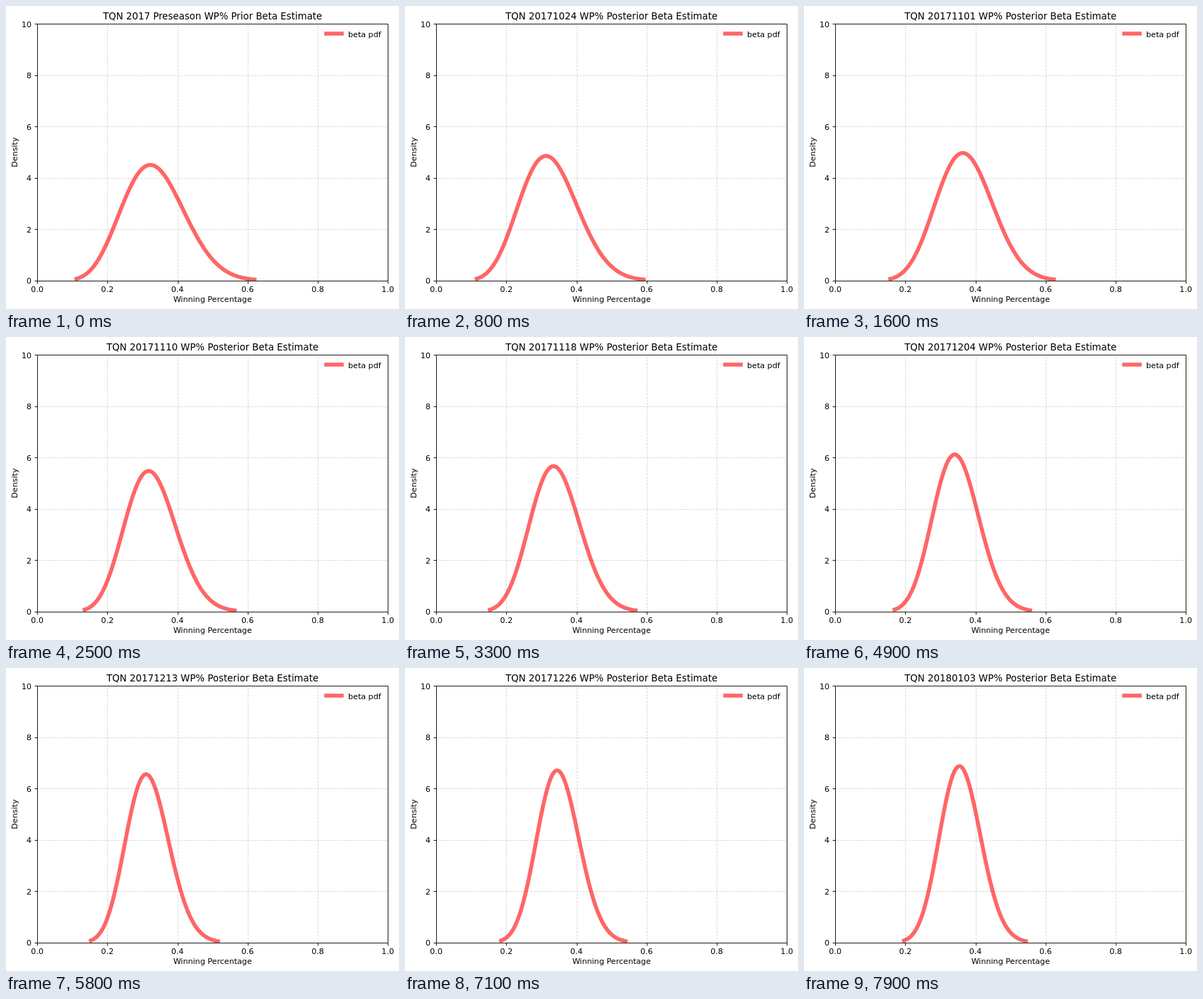
These frames come from a looping animation (556x428 px, 8000 ms). An HTML page:

```html
<!DOCTYPE html>
<html lang="en">
<head>
<meta charset="utf-8">
<title>Beta estimate</title>
<style>
  html, body { margin: 0; width: 100%; height: 100%; overflow: hidden; background: #fff; }
  svg { display: block; font: 11.11px "DejaVu Sans", sans-serif; }
  .mid { text-anchor: middle; }
  .end { text-anchor: end; }
  .title { font-size: 13.33px; }
  .grid { stroke: #b0b0b0; stroke-opacity: .5; stroke-width: .89; stroke-dasharray: 3.29 1.42; }
  .axis { fill: none; stroke: #000; stroke-width: .89; }
  .curve { fill: none; stroke: #f00; stroke-opacity: .6; stroke-width: 5.56; stroke-linecap: square; stroke-linejoin: round; }
</style>
</head>
<body>
<svg id="plot" width="556" height="428" viewBox="0 0 556 428">
  <clipPath id="area"><rect x="44" y="25" width="496" height="363"/></clipPath>
</svg>
<script>
const STEP = 100, STEPS = 80;
const LEFT = 44.2, TOP = 25.4, WIDTH = 496, HEIGHT = 362.4;
const BOTTOM = TOP + HEIGHT, CENTER = LEFT + WIDTH / 2;
const PRIOR = { a: 9.55, b: 18.95 };

// Days after 16 October 2017 on which a game was won or lost
const WINS = [7, 9, 15, 16, 26, 32, 34, 43, 49, 61, 63, 66, 71, 74, 78];
const LOSSES = [2, 4, 5, 12, 18, 20, 21, 23, 25, 28, 31, 37, 39, 41, 45, 47,
  50, 52, 54, 57, 58, 65, 68, 76, 79];

const plot = document.getElementById('plot');

function add(tag, attrs, text = '') {
  const el = document.createElementNS('http://www.w3.org/2000/svg', tag);
  for (const name in attrs) el.setAttribute(name, attrs[name]);
  el.textContent = text;
  return plot.appendChild(el);
}

const label = (x, y, text, cls = '', extra = {}) =>
  add('text', { x, y, class: cls, ...extra }, text);
const path = (d, cls, extra = {}) => add('path', { d, class: cls, ...extra });

// Thin lines sit on pixel centres; the curve keeps exact coordinates
const snap = v => Math.round(v) + .5;
const atX = i => LEFT + WIDTH * i / 5;
const atY = i => BOTTOM - HEIGHT * i / 5;
const [x0, x1, y0, y1] = [atX(0), atX(5), atY(0), atY(5)].map(snap);

for (let i = 1; i < 5; i++) {
  path(`M${snap(atX(i))} ${y0}V${y1}`, 'grid');
  path(`M${x0} ${snap(atY(i))}H${x1}`, 'grid');
}

const group = add('g', { 'clip-path': 'url(#area)' });
const curve = group.appendChild(path('', 'curve'));

for (let i = 0; i <= 5; i++) {
  path(`M${snap(atX(i))} ${y0}v3.9`, 'axis');
  path(`M${x0} ${snap(atY(i))}h-3.9`, 'axis');
  label(atX(i), 404, (i / 5).toFixed(1), 'mid');
  label(36.2, Math.round(atY(i) + 4.3), i * 2, 'end');
}
path(`M${x0} ${y0}V${y1}H${x1}V${y0}z`, 'axis');

label(CENTER, 418, 'Winning Percentage', 'mid');
label(0, 0, 'Density', 'mid', { transform: `translate(16 ${TOP + HEIGHT / 2}) rotate(-90)` });
path('M453 39H475', 'curve');
label(484, 44, 'beta pdf');
const title = label(CENTER, 19, '', 'mid title');

function betaPath(a, b) {
  const raw = x => Math.exp((a - 1) * Math.log(x) + (b - 1) * Math.log(1 - x));
  const n = 2000;
  const cells = Array.from({ length: n }, (_, i) => raw((i + .5) / n) / n);
  const area = cells.reduce((sum, v) => sum + v, 0);

  function quantile(p) {
    let rest = p * area, i = 0;
    while (rest > cells[i]) rest -= cells[i++];
    return (i + rest / cells[i]) / n;
  }

  const lo = quantile(.001), hi = quantile(.999);
  const points = Array.from({ length: 100 }, (_, i) => {
    const x = lo + (hi - lo) * i / 99;
    const y = raw(x) / area;
    return (LEFT + x * WIDTH).toFixed(2) + ' ' + (BOTTOM - y * HEIGHT / 10).toFixed(2);
  });
  return 'M' + points.join('L');
}

function titleFor(day) {
  if (day === 0) return 'TQN 2017 Preseason WP% Prior Beta Estimate';
  const date = new Date(Date.UTC(2017, 9, 16 + day)).toISOString().slice(0, 10);
  return `TQN ${date.replace(/-/g, '')} WP% Posterior Beta Estimate`;
}

const countTo = (days, day) => days.filter(d => d <= day).length;

let shown = -1;
function draw(time) {
  const day = Math.floor(time / STEP) % STEPS;
  if (day === shown) return;
  shown = day;
  title.textContent = titleFor(day);
  curve.setAttribute('d', betaPath(PRIOR.a + countTo(WINS, day), PRIOR.b + countTo(LOSSES, day)));
}

const start = performance.now();
function tick() {
  draw(performance.now() - start);
  requestAnimationFrame(tick);
}
tick();
</script>
</body>
</html>
```
